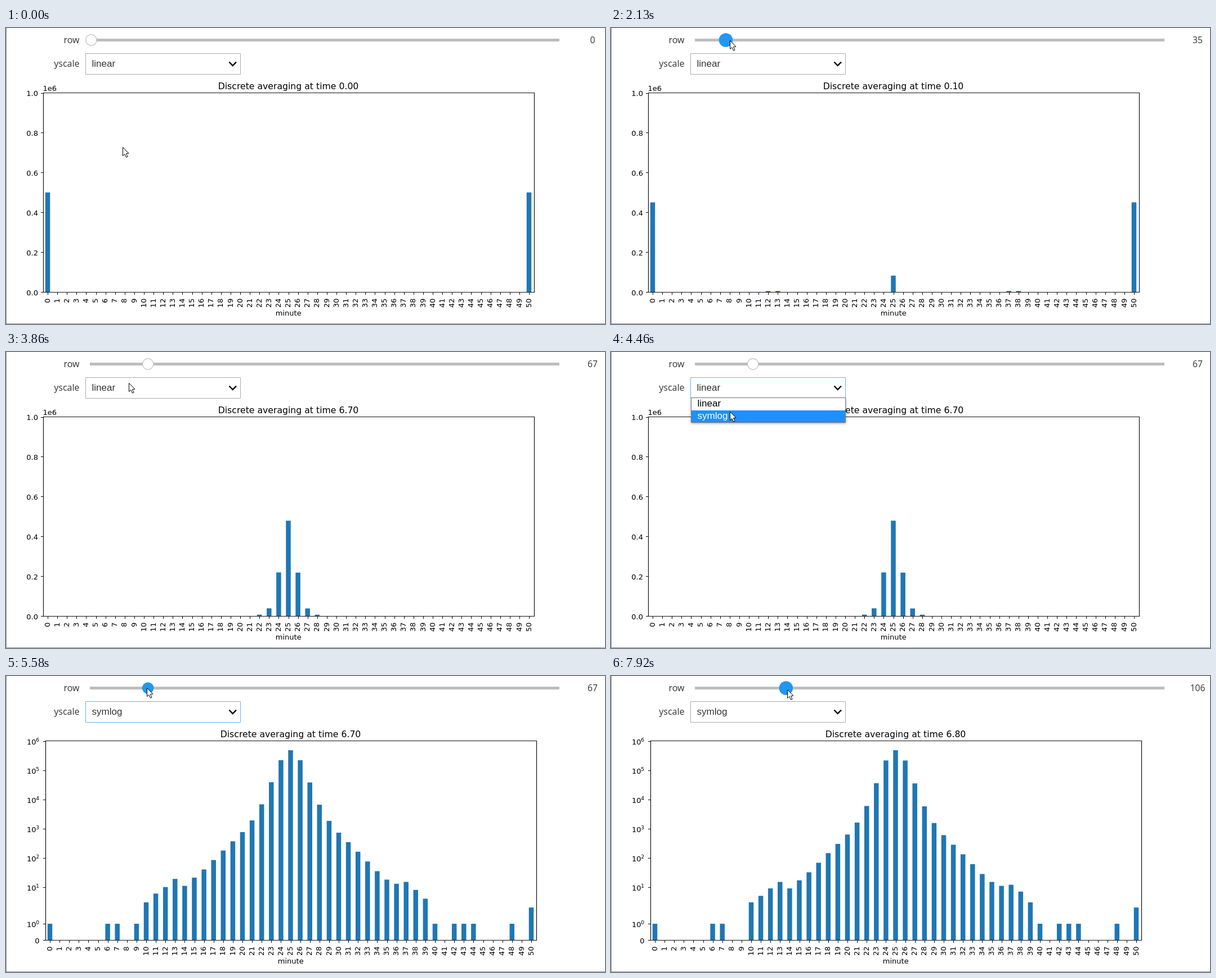
An HTML page with a canvas for the animation above (8000 ms loop, 1064 by 527 pixels).

```html
<!DOCTYPE html>
<html lang="en">
<head>
<meta charset="utf-8">
<title>Discrete averaging</title>
<style>
  html, body { margin: 0; width: 100%; height: 100%; overflow: hidden; background: #fff; }
  canvas { display: block; }
</style>
</head>
<body>
<canvas id="stage" width="1064" height="527"></canvas>
<script>
const ctx = document.getElementById('stage').getContext('2d');
const LOOP = 8000;
const PLOT = '"DejaVu Sans", sans-serif';
const LABEL = '"Open Sans", "Noto Sans", sans-serif';
const FORM = '"Liberation Sans", Arial, sans-serif';
const BASE = 470, HEIGHT = 354.5, MINUTES = 51;

// The screen refreshes about every STEP ms within each burst, and rests between them.
const STEP = 135;
const BURSTS = [
  [130, 1050], [1190, 2130], [2280, 3090], [3350, 4300], [4460, 4460],
  [4780, 5580], [5730, 5730], [6190, 7130], [7250, 7920]
];

// Pointer key points: time, x, y; a final 1 marks an eased move.
const POINTER = [
  [0, 207, 212], [1050, 156, 20, 1], [2130, 211, 22], [3090, 255, 20], [4000, 210, 62, 1],
  [4300, 210, 86, 1], [4460, 211, 106], [4700, 211, 106], [5580, 250, 21, 1],
  [6190, 254, 22], [7130, 280, 22], [7920, 313, 24]
];
const ROW = [[1150, 0], [2130, 35], [3090, 67], [6250, 67], [7130, 84], [7920, 106]];

// Plot redraws lag behind the slider: time, row shown.
const REDRAWS = [[0, 0], [1990, 1], [2810, 32], [3620, 67], [7380, 68]];
const OPEN = 4160, HOVER_SECOND = 4460, PICK = 4780, LOG_SHOWN = 5310, BLUR = 6190;

// Late profile: distance from the centre, log10 of the count.
const LATE = [
  [0, 5.68], [1, 5.34], [3, 3.83], [4, 3.28], [5, 2.88], [7, 2.25],
  [9, 1.6], [11, 1.05], [12, 1.28], [15, 0.5], [16, -0.25], [17, -1]
];
const STRAGGLERS = [0, 6, 7, 42, 43, 44, 48];

function heldTime(t) {
  let held = 0;
  for (const [start, end] of BURSTS) {
    if (t < start) break;
    const gaps = Math.round((end - start) / STEP);
    const gap = (end - start) / gaps;
    held = gaps ? Math.min(end, start + gap * Math.floor((t - start + 0.5) / gap)) : start;
  }
  return held;
}

function along(keys, at, field) {
  if (at <= keys[0][0]) return keys[0][field];
  for (let i = 1; i < keys.length; i++) {
    const a = keys[i - 1], b = keys[i];
    if (at > b[0]) continue;
    let p = (at - a[0]) / (b[0] - a[0]);
    if (b[3]) p = p * p * (3 - 2 * p);
    return a[field] + (b[field] - a[field]) * p;
  }
  return keys[keys.length - 1][field];
}

// Two extremes average into middles, then into a bell, then narrow towards the centre.
function countAt(row, i) {
  const d = Math.abs(i - 25);
  if (row < 2) {
    if (d === 25) return 500e3 - 50e3 * row;
    if (d === 0) return 82e3 * row;
    return d === 12 || d === 13 ? 5e3 * row : 0;
  }
  if (row < 60) return 104e3 / Math.cosh(d / 3.16);
  if (i === 50) return 2;
  if (STRAGGLERS.includes(i)) return 1;
  const skewed = i > 25 ? d + 0.0025 * d * d : d;
  const decay = 0.09 * (row - 67) * (1 - Math.exp(-d * d / 9));
  return Math.round(10 ** (along(LATE, skewed, 1) - decay));
}

function text(str, x, y, size, family, align = 'left', color = '#000') {
  ctx.font = `${size}px ${family}`;
  ctx.textAlign = align;
  ctx.fillStyle = color;
  ctx.fillText(str, x, y);
}

function rect(x, y, w, h, color) {
  ctx.fillStyle = color;
  ctx.fillRect(x, y, w, h);
}

function path(points, close) {
  ctx.beginPath();
  for (const [x, y] of points) ctx.lineTo(x, y);
  if (close) ctx.closePath();
}

function stroke(color, width) {
  ctx.strokeStyle = color;
  ctx.lineWidth = width;
  ctx.stroke();
}

function frame(x, y, w, h, color, width = 1) {
  ctx.beginPath();
  ctx.rect(x + 0.5, y + 0.5, w - 1, h - 1);
  stroke(color, width);
}

const linear = v => v / 1e6 * HEIGHT;
const symlog = v => {
  const level = x => x <= 2 ? x / 0.9 : 2 * (1 / 0.9 + Math.log10(x / 2));
  return level(v) / level(1e6) * HEIGHT;
};

function drawPlot(row, log) {
  const shift = log ? 4 : 0, left = 66 + shift;
  const scale = log ? symlog : linear;

  text(`Discrete averaging at time ${(row / 10).toFixed(2)}`, 501.5 + shift, 108.5, 15.7, PLOT, 'center');
  text('minute', 501.7 + shift, 512, 13, PLOT, 'center');

  for (let i = 0; i < MINUTES; i++) {
    const x = 74 + shift + 17.1 * i;
    const h = scale(countAt(row, i));
    if (h > 0.8) rect(x - 4.25, BASE - h, 8.5, h, '#1f77b4');
    rect(Math.round(x), BASE, 1, 5, '#000');
    ctx.save();
    ctx.translate(x + 3.6, 481.5);
    ctx.rotate(-Math.PI / 2);
    text(i, 0, 0, 13, PLOT, 'right');
    ctx.restore();
  }

  const tick = v => {
    const y = BASE - scale(v);
    rect(left - 4, Math.round(y), 4, 1, '#000');
    return y;
  };
  if (log) {
    text('0', 59.5, tick(0) + 6, 13, PLOT, 'right');
    for (let e = 0; e <= 6; e++) {
      const y = tick(10 ** e);
      text('10', 37, y + 6, 13, PLOT);
      text(e, 53.3, y + 1, 9.1, PLOT);
    }
  } else {
    text('1e6', 65.5, 112, 13, PLOT);
    for (let k = 0; k <= 5; k++) text((k / 5).toFixed(1), 57, tick(k * 2e5) + 5.5, 13, PLOT, 'right');
  }
  frame(left, 115, 873, 356, '#111', 1.2);
}

function drawSlider(row, t, px, py) {
  text('row', 130.5, 27, 16, LABEL, 'right', '#333');
  text(row, 1042, 27, 15.6, LABEL, 'center', '#333');
  rect(149, 19, 834, 5, '#bdbdbd');
  const x = 151.3 + 1.505 * row;
  const active = (t >= 1190 && t <= 3090) || t >= BLUR;
  const hot = active || Math.hypot(px - x, py - 21.5) < 10;
  ctx.beginPath();
  ctx.arc(x, 21.5, active ? 12.3 : hot ? 10.3 : 9.8, 0, 2 * Math.PI);
  ctx.fillStyle = hot ? '#2196f3' : '#fff';
  ctx.fill();
  if (!hot) stroke('#bdbdbd', 1.2);
}

function drawSelect(t) {
  text('yscale', 130.5, 69, 16, LABEL, 'right', '#333');
  rect(141, 45, 276, 38, '#fff');
  frame(141, 45, 276, 38, t >= OPEN && t < BLUR ? '#64b5f6' : '#ababab');
  text(t >= PICK ? 'symlog' : 'linear', 152.5, 69, 17, FORM, 'left', '#333');
  path([[396.5, 60.5], [402.7, 67], [409, 60.5]]);
  stroke('#000', 2.5);
}

function drawOptions(t) {
  if (t < OPEN || t >= PICK) return;
  const chosen = t >= HOVER_SECOND ? 1 : 0;
  ctx.save();
  ctx.shadowColor = 'rgba(0,0,0,.4)';
  ctx.shadowBlur = 4;
  ctx.shadowOffsetY = 1;
  rect(142, 82, 275, 44, '#fff');
  ctx.restore();
  rect(143, 82 + 22 * chosen, 273, 22, '#1e90ff');
  frame(142, 81, 275, 45, '#777');
  ['linear', 'symlog'].forEach((name, i) =>
    text(name, 153.5, 97 + 22 * i, 17, FORM, 'left', i === chosen ? '#fff' : '#000'));
}

function drawPointer(x, y) {
  ctx.save();
  ctx.translate(Math.round(x) + 0.5, Math.round(y) + 0.5);
  path([[0, 0], [0, 15], [3.4, 12], [6, 17.7], [8.5, 16.6], [6, 11], [10.5, 10.6]], true);
  ctx.fillStyle = '#fff';
  ctx.fill();
  stroke('#000', 1);
  ctx.restore();
}

function draw(now) {
  const t = heldTime(now % LOOP);
  const px = along(POINTER, t, 1), py = along(POINTER, t, 2);
  const shown = REDRAWS.filter(([at]) => at <= t).pop()[1];
  rect(0, 0, 1064, 527, '#fff');
  rect(0, 0, 1, 527, '#8c8c8c');
  rect(0, 526, 1064, 1, '#8c8c8c');
  drawPlot(shown, t >= LOG_SHOWN);
  drawSlider(Math.round(along(ROW, t, 1)), t, px, py);
  drawSelect(t);
  drawOptions(t);
  drawPointer(px, py);
}

const began = performance.now();
function refresh() {
  draw(performance.now() - began);
  requestAnimationFrame(refresh);
}
refresh();
</script>
</body>
</html>
```
